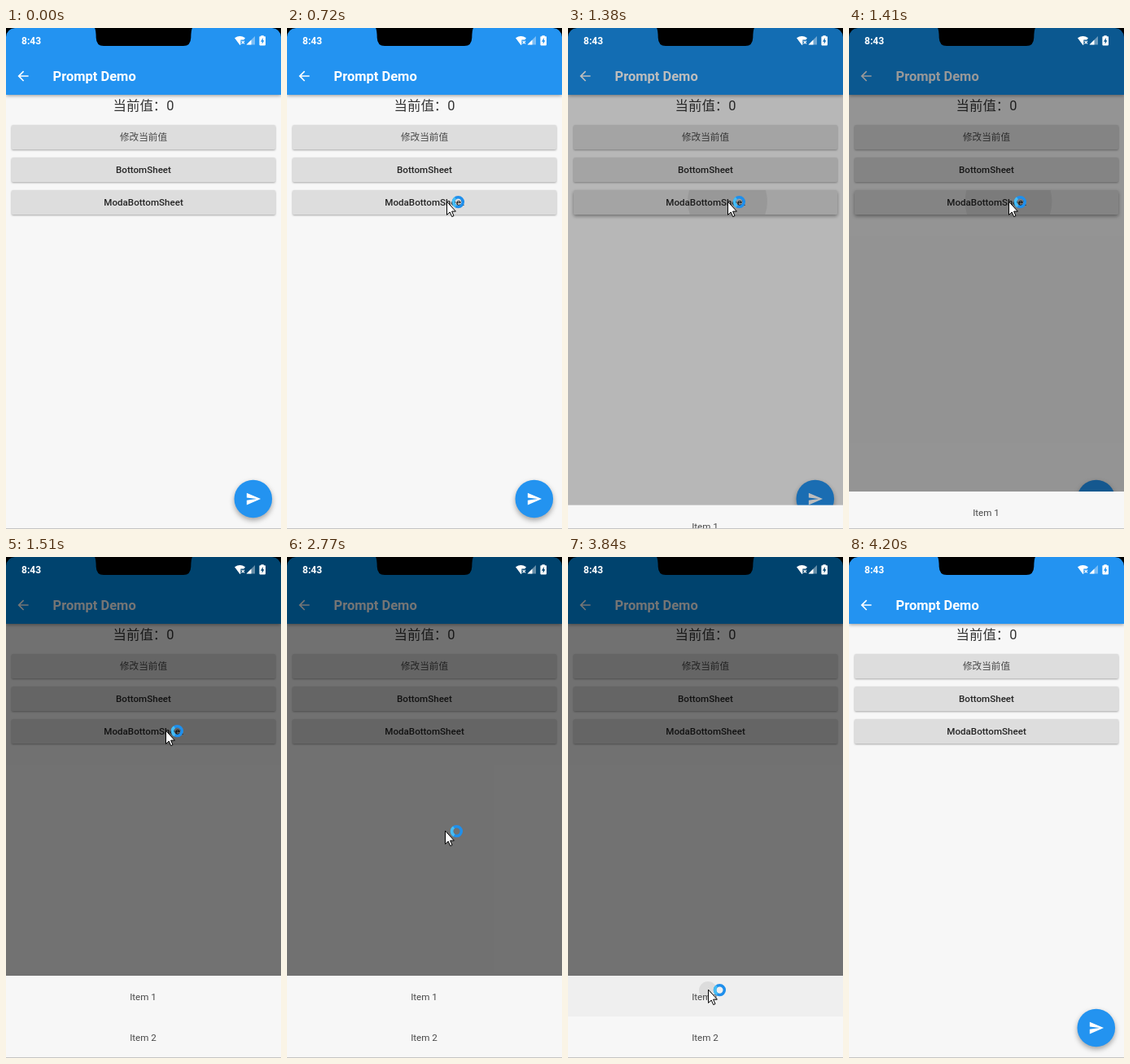
Write an HTML page that moves like this. It is 338x615 px and loops after 5.27 s.

```html
<!DOCTYPE html>
<html lang="zh-CN">
<head>
<meta charset="utf-8">
<title>Prompt Demo</title>
<style>
  html, body { margin: 0; width: 100%; height: 100%; overflow: hidden; background: #f7f7f7; }
  svg { display: block; width: 338px; height: 615px; }
  text { font-family: Roboto, "Noto Sans CJK SC", "Noto Sans CJK", sans-serif; }
  .mid { text-anchor: middle; }
  .label { font-size: 11.6px; font-weight: 500; fill: #262626; }
  .item { font-size: 11.6px; fill: #484848; }
  .bar { filter: drop-shadow(0 1.5px 2px rgba(0,0,0,.4)); }
  .btn { fill: #dddddd; filter: drop-shadow(0 1.3px 1px rgba(0,0,0,.32)); }
  .fab { filter: drop-shadow(0 3px 3px rgba(0,0,0,.35)); }
</style>
</head>
<body>
<svg viewBox="0 0 338 615" xmlns="http://www.w3.org/2000/svg">
  <defs>
    <clipPath id="btnClip"><rect x="7" y="199" width="324" height="30" rx="1.6"/></clipPath>
    <clipPath id="itemClip"><rect width="338" height="50"/></clipPath>
  </defs>

  <rect width="338" height="615" fill="#f7f7f7"/>
  <rect class="bar" id="bar" width="338" height="82"/>
  <path transform="translate(11.2 49.2) scale(.82)" fill="#fff"
    d="M20 11H7.83l5.59-5.59L12 4l-8 8 8 8 1.41-1.41L7.83 13H20z"/>
  <text x="57.5" y="65" font-size="16.5" font-weight="600" fill="#fff">Prompt Demo</text>
  <text class="mid" x="169" y="101.3" font-size="16.4" fill="#333">当前值：0</text>

  <rect class="btn" x="7" y="119" width="324" height="30" rx="1.6"/>
  <rect class="btn" x="7" y="159" width="324" height="30" rx="1.6"/>
  <rect class="btn" id="pressed" x="7" y="199" width="324" height="30" rx="1.6"/>
  <g clip-path="url(#btnClip)"><circle id="btnInk" cx="196" cy="213"/></g>
  <text class="mid" x="169" y="138.4" font-size="11.6" fill="#484848">修改当前值</text>
  <text class="mid label" x="169" y="178.2">BottomSheet</text>
  <text class="mid label" x="169" y="218.2">ModaBottomSheet</text>

  <circle class="fab" cx="303.8" cy="578" r="23.3" fill="#2393f0"/>
  <path transform="translate(294.2 568.2) scale(.82)" fill="#fff" d="M2.01 21L23 12 2.01 3 2 10l15 2-15 2z"/>

  <rect id="scrim" width="338" height="615"/>

  <g id="sheet">
    <rect width="338" height="100" fill="#f7f7f7"/>
    <g clip-path="url(#itemClip)">
      <rect id="itemGlow" width="338" height="50"/>
      <circle id="itemInk" cx="172" cy="18"/>
    </g>
    <text class="mid item" x="168.5" y="30">Item 1</text>
    <text class="mid item" x="168.5" y="80">Item 2</text>
  </g>
  <rect y="614" width="338" height="1" fill="#c4c4c4"/>

  <!-- status bar and screen cut-outs -->
  <path d="M0 0H11Q1 1 0 11zM338 0H327Q337 1 338 11z"/>
  <path d="M109 0Q110.5 2 110.7 12Q111 22 120 22H218Q227 22 227.3 12Q227.5 2 229 0z"/>
  <text x="19" y="20" font-size="12" font-weight="600" fill="#fff">8:43</text>
  <g fill="#fff">
    <path d="M281 12.3Q287.5 7.8 294 12.3L292.3 14.6H288.4V20.6L287.5 21z"/>
    <path d="M289.6 15.8l3.4 3.6M293 15.8l-3.4 3.6" stroke="#fff" stroke-width="1.2"/>
    <path d="M306 10V20.5H295.5z" opacity=".4"/>
    <path d="M301.5 14.5V20.5H295.5z"/>
    <path fill-rule="evenodd" d="M313.4 10.3V9.2H316.8V10.3H318.2Q319 10.3 319 11.1V20.6Q319 21.4 318.2 21.4H312.2Q311.4 21.4 311.4 20.6V11.1Q311.4 10.3 312.2 10.3zM315.8 12L313 16.7H314.7V19.8L317.4 15.2H315.8z"/>
  </g>

  <circle id="tap" r="15" fill-opacity=".06"/>
  <g id="cursor">
    <path transform="translate(-1 -.4)" d="M.5 .5V16.8L4.2 13.4L6.7 19L9 18L6.6 12.5H11.4z" fill="#fff" stroke="#000"/>
    <g transform="translate(13.4 .6)" fill="none" stroke-width="3.5">
      <circle r="5.9" stroke="#1f8fec"/>
      <path d="M-2.9 5.1A5.9 5.9 0 0 1 -3.4 -4.8" stroke="#45bdf5"/>
    </g>
  </g>
</svg>
<script>
const LOOP = 5270;
const $ = id => document.getElementById(id);
const set = (id, attrs) => { for (const k in attrs) $(id).setAttribute(k, attrs[k]); };
const show = on => on ? 'visible' : 'hidden';
const span = (t, a, b) => Math.max(0, Math.min(1, (t - a) / (b - a)));
const mix = (a, b, p) => a + (b - a) * p;
const easeOut = p => 1 - (1 - p) ** 2;

// cubic-bezier(.25, .1, .25, 1), solved by bisection
function ease(x) {
  const bez = (s, a, b) => 3 * s * (1 - s) * (1 - s) * a + 3 * s * s * (1 - s) * b + s * s * s;
  let lo = 0, hi = 1;
  for (let i = 0; i < 20; i++) {
    const m = (lo + hi) / 2;
    if (bez(m, .25, .25) < x) lo = m; else hi = m;
  }
  return bez(lo, .1, 1);
}

// first trip goes to the button and settles, second goes to the list
function pointer(t) {
  if (t < 2770) {
    const p = easeOut(span(t, 80, 590)), s = span(t, 600, 720);
    return [mix(297, 202, p) - 5 * s, mix(337, 206, p) + 7 * s];
  }
  const p = easeOut(span(t, 2770, 3380));
  return [mix(195, 173, p), mix(335, 531, p)];
}

function draw(t) {
  const closing = span(t, 3960, 4150);
  const open = span(t, 1330, 1510) - closing;
  set('bar', { fill: `rgb(${35 * (1 - open)},147,241)` });
  set('scrim', { 'fill-opacity': .54 * ease(open) });
  set('sheet', { transform: `translate(0 ${614 - 100 * open})`, visibility: show(open > 0) });

  const press = span(t, 1150, 1510);
  const lift = Math.sin(Math.PI * press);
  set('btnInk', {
    r: 15 + 53 * press,
    'fill-opacity': .07 * (1 - span(t, 1410, 1510)),
    visibility: show(press > 0)
  });
  $('pressed').style.filter =
    `drop-shadow(0 ${1.3 + 1.5 * lift}px ${1 + 1.5 * lift}px rgba(0,0,0,${.32 + .08 * lift}))`;

  const chosen = show(t >= 3740 && closing < 1);
  set('itemInk', { r: 11 + 49 * closing, 'fill-opacity': .08 * (1 - closing), visibility: chosen });
  set('itemGlow', { 'fill-opacity': .033 * (1 - closing), visibility: chosen });

  const [x, y] = pointer(t).map(Math.round);
  const held = t >= 920 && t < 1150 || t >= 3560 && t < 3740;
  set('tap', { cx: x - 1, cy: y, visibility: show(held) });
  set('cursor', { transform: `translate(${x} ${y})`, visibility: show(t >= 80 && t < 4200) });
}

const start = performance.now();
function frame() {
  draw((performance.now() - start) % LOOP);
  requestAnimationFrame(frame);
}
frame();
</script>
</body>
</html>
```
